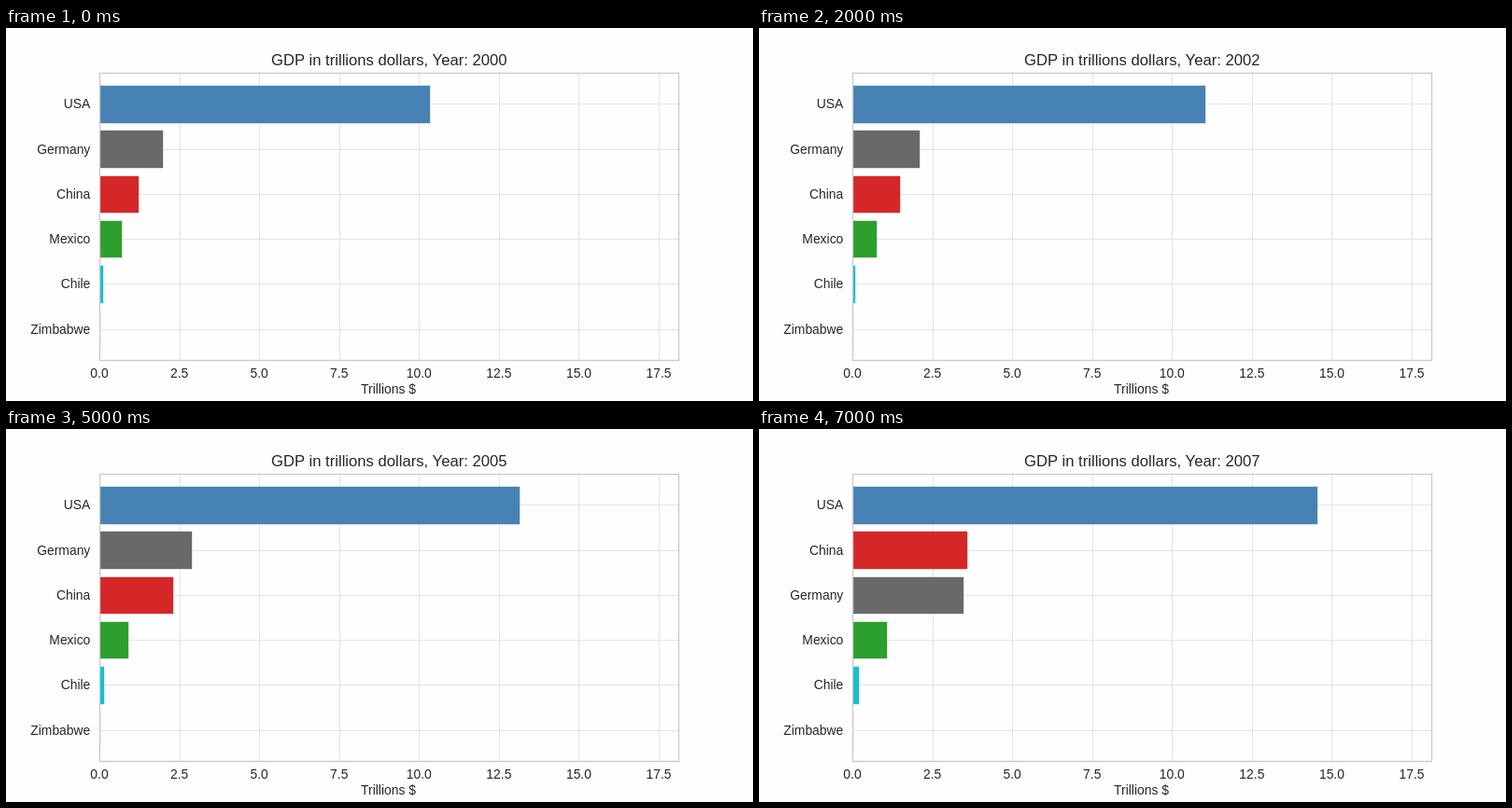
Write an HTML page that moves like this. It is 800 by 400 pixels and loops after 8000 ms.

```html
<!DOCTYPE html>
<html lang="en">
<head>
<meta charset="utf-8">
<title>GDP by year</title>
<style>
  html, body { margin: 0; width: 100%; height: 100%; overflow: hidden; background: #fefefe; }
  svg { display: block; width: 800px; height: 400px; }
  text { font: 13.89px "Liberation Sans", Arial, sans-serif; fill: #262626; text-anchor: middle; }
  #title { font-size: 16.67px; }
  .end { text-anchor: end; }
  .grid { stroke: #e4e4e4; }
  .bar, .frame { stroke-width: 1.39; }
  .frame { fill: none; stroke: #ccc; }
</style>
</head>
<body>
<svg viewBox="0 0 800 400">
  <clipPath id="plot"><rect x="100" y="48" width="620" height="308"/></clipPath>
  <g id="grid"></g>
  <g id="bars" clip-path="url(#plot)"></g>
  <rect class="frame" x="100.5" y="48.5" width="620" height="308"/>
  <g id="labels"></g>
  <text id="title" x="410.3" y="40"></text>
  <text x="409.5" y="392">Trillions $</text>
</svg>
<script>
const FIRST_YEAR = 2000, YEARS = 8, STEP = 1000;
const LEFT = 100, TOP = 48, RIGHT = 720, BOTTOM = 356;
const UNIT = 34.23, ROW = 308 / 6.38;

// GDP in trillions of dollars, one value per year
const countries = [
  { name: 'USA', color: '#4682b4', gdp: [10.31, 10.66, 11.01, 11.54, 12.3, 13.12, 13.91, 14.52] },
  { name: 'Germany', color: '#696969', gdp: [1.96, 1.95, 2.08, 2.51, 2.83, 2.86, 3, 3.45] },
  { name: 'China', color: '#d62728', gdp: [1.21, 1.34, 1.47, 1.66, 1.96, 2.29, 2.75, 3.56] },
  { name: 'Mexico', color: '#2ca02c', gdp: [0.68, 0.73, 0.74, 0.71, 0.77, 0.88, 0.97, 1.05] },
  { name: 'Chile', color: '#17becf', gdp: [0.078, 0.071, 0.07, 0.076, 0.099, 0.123, 0.155, 0.174] },
  { name: 'Zimbabwe', color: '#d3d3d3', gdp: Array(YEARS).fill(0.007) }
];

const byId = id => document.getElementById(id);
const snap = v => Math.round(v) + 0.5;
const xAt = v => LEFT + v * UNIT;
const rowTop = i => TOP + ROW * (0.29 + i);
const rowMid = i => rowTop(i) + ROW * 0.4;

function add(parent, tag, attrs, text = '') {
  const el = document.createElementNS('http://www.w3.org/2000/svg', tag);
  for (const k in attrs) el.setAttribute(k, attrs[k]);
  el.textContent = text;
  return parent.appendChild(el);
}

for (let v = 0; v <= 17.5; v += 2.5) {
  const x = snap(xAt(v));
  add(byId('grid'), 'line', { class: 'grid', x1: x, x2: x, y1: TOP, y2: BOTTOM });
  add(byId('labels'), 'text', { x: xAt(v), y: 375 }, v.toFixed(1));
}

const rows = countries.map((_, i) => {
  const y = snap(rowMid(i)), top = snap(rowTop(i));
  add(byId('grid'), 'line', { class: 'grid', x1: LEFT, x2: RIGHT, y1: y, y2: y });
  return {
    bar: add(byId('bars'), 'rect', {
      class: 'bar', x: LEFT + 0.5, y: top, height: snap(rowTop(i) + ROW * 0.8) - top
    }),
    label: add(byId('labels'), 'text', { class: 'end', x: 90.3, y: Math.round(rowMid(i) + 5) })
  };
});

function draw(n) {
  byId('title').textContent = `GDP in trillions dollars, Year: ${FIRST_YEAR + n}`;
  const ranked = [...countries].sort((a, b) => b.gdp[n] - a.gdp[n]);
  ranked.forEach(({ name, color, gdp }, i) => {
    const { bar, label } = rows[i];
    bar.setAttribute('width', Math.max(0.01, snap(xAt(gdp[n])) - LEFT - 0.5));
    bar.setAttribute('fill', color);
    bar.setAttribute('stroke', color);
    label.textContent = name;
  });
}

let shown = 0;
const start = performance.now();
function tick() {
  const n = Math.floor((performance.now() - start) / STEP) % YEARS;
  if (n !== shown) draw(shown = n);
  requestAnimationFrame(tick);
}
draw(shown);
requestAnimationFrame(tick);
</script>
</body>
</html>
```
